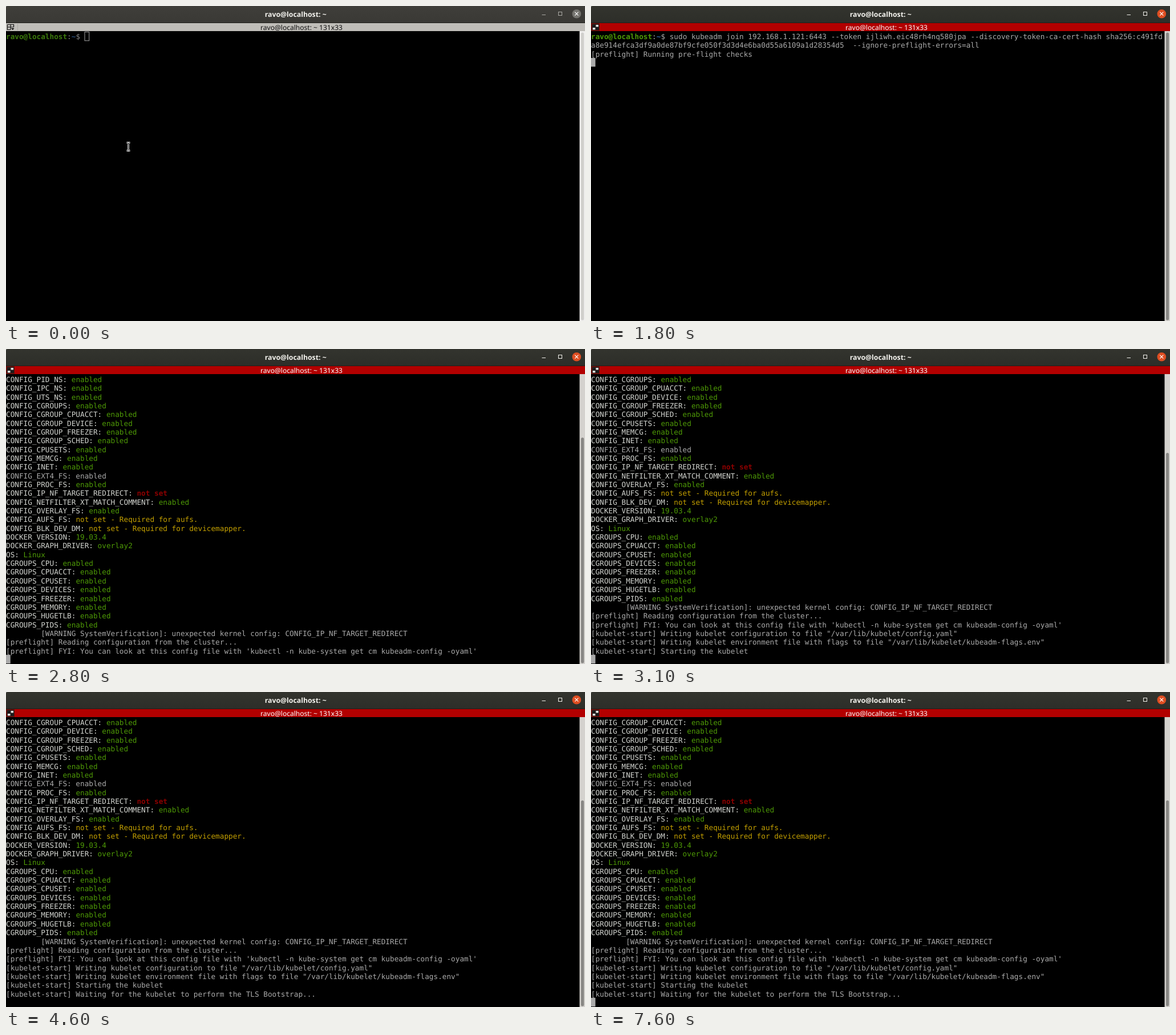
Animation, 1015 px wide and 552 px high, one loop 8000 ms. Source, as an HTML page:

```html
<!DOCTYPE html>
<html lang="en">
<head>
<meta charset="utf-8">
<title>Terminal</title>
<style>
  html, body { margin: 0; width: 100%; height: 100%; overflow: hidden; background: #000; }
  svg { display: block; }
  text { white-space: pre; text-rendering: geometricPrecision; }
  #rows text { font: 12.717px "DejaVu Sans Mono", monospace; }
  #rows .bold { font-weight: bold; }
  .ui { font-family: "Noto Sans", sans-serif; text-anchor: middle; }
</style>
</head>
<body>
<svg id="stage" width="1015" height="552" viewBox="0 0 1015 552">
  <defs>
    <linearGradient id="barOff" x2="0" y2="1"><stop stop-color="#3f3e3a"/><stop offset="1" stop-color="#3a3935"/></linearGradient>
    <linearGradient id="barOn" x2="0" y2="1"><stop stop-color="#33342e"/><stop offset="1" stop-color="#2d2e29"/></linearGradient>
  </defs>
  <rect width="1015" height="552"/>
  <rect id="bar" width="1015" height="29"/>
  <path d="M0 0H2L0 2Z" fill="#777"/>
  <path d="M0 29.5H1015" stroke="#1f1f1b"/>
  <text class="ui" x="507.7" y="18.5" font-size="12.3" font-weight="bold" fill="#f4f3ee">ravo@localhost: ~</text>
  <g id="buttons" fill="none">
    <path d="M939.5 15.5H946"/>
    <rect x="968.5" y="10.5" width="6" height="6"/>
  </g>
  <circle id="close" cx="1000.3" cy="13.7" r="7.8"/>
  <path d="M997.3 10.7l6 6m0 -6l-6 6" stroke="#fff" stroke-width="1.2"/>

  <rect id="strip" y="30" width="1015" height="14"/>
  <text id="stripText" class="ui" x="518" y="41.7" font-size="12.06">ravo@localhost: ~ 131x33</text>
  <g id="iconOff">
    <path d="M2.5 32.5H13.5V37M2.5 32.5V41.5H8M2.5 37H13.5M8 32.5V41.5" fill="none" stroke="#111" stroke-width="1.2"/>
    <path d="M9 39H14.5L11.7 42Z"/>
    <path d="M20.5 31V43" stroke="#aaa8a3"/>
  </g>
  <g id="iconOn">
    <rect x="0" y="30" width="15" height="14" fill="#65110c"/>
    <rect x="2" y="32" width="12" height="10" fill="#1b1b1b"/>
    <path d="M8.5 33H13V36.5H8.5ZM3 38H7.5V41.5H3Z" fill="#e4e4e0"/>
  </g>

  <g id="rows"></g>
  <rect id="cursor" width="7.7" height="15.3"/>
  <rect id="trough" x="1005.5" y="44" width="9.5" height="508"/>
  <rect id="thumb" x="1008" width="5.2" rx="2.6"/>
  <g id="mouse" fill="none">
    <path d="M-3 -7H-1L0 -6L1 -7H3M0 -6V6M-3 7H-1L0 6L1 7H3" stroke="#eee" stroke-width="3"/>
    <path d="M-3 -7H-1L0 -6L1 -7H3M0 -6V6M-3 7H-1L0 6L1 7H3" stroke="#000"/>
  </g>
</svg>
<script>
const LOOP = 8000, COLS = 131, ROWS = 33;
const CELL = 7.656, PITCH = 15.34, TOP = 45;
const GREY = "#aaaaaa", LABEL = "#d3d5d0", GREEN = "#4e9a06", RED = "#8c0000", YELLOW = "#c4a000";
const $ = id => document.getElementById(id);
const set = (id, attrs) => { for (const k in attrs) $(id).setAttribute(k, attrs[k]); };

const HOST = "ravo@localhost";
const COMMAND = "sudo kubeadm join 192.168.1.121:6443 --token ijliwh.eic48rh4nq580jpa " +
  "--discovery-token-ca-cert-hash sha256:c491fda8e914efca3df9a0de87bf9cfe050f3d3d4e6ba0d55a6109a1d28354d5" +
  "  --ignore-preflight-errors=all";
const PROMPT = HOST + ":~$ ";
const INDENT = " ".repeat(8);

const wrap = s => s.match(new RegExp(`.{1,${COLS}}`, "g"));
const enabled = (prefix, names) => names.split(" ").map(n => `${prefix}_${n}: enabled`);

const lines = [
  ...wrap(PROMPT + COMMAND),
  "[preflight] Running pre-flight checks",
  ...wrap(INDENT + '[WARNING IsDockerSystemdCheck]: detected "cgroupfs" as the Docker cgroup driver. ' +
    'The recommended driver is "systemd". Please follow the guide at https://kubernetes.io/docs/setup/cri/'),
  "[preflight] The system verification failed. Printing the output from the verification:",
  "KERNEL_VERSION: 5.0.0-37-generic",
  ...enabled("CONFIG", "NAMESPACES NET_NS PID_NS IPC_NS UTS_NS CGROUPS CGROUP_CPUACCT CGROUP_DEVICE " +
    "CGROUP_FREEZER CGROUP_SCHED CPUSETS MEMCG INET EXT4_FS PROC_FS"),
  "CONFIG_IP_NF_TARGET_REDIRECT: not set",
  ...enabled("CONFIG", "NETFILTER_XT_MATCH_COMMENT OVERLAY_FS"),
  "CONFIG_AUFS_FS: not set - Required for aufs.",
  "CONFIG_BLK_DEV_DM: not set - Required for devicemapper.",
  "DOCKER_VERSION: 19.03.4",
  "DOCKER_GRAPH_DRIVER: overlay2",
  "OS: Linux",
  ...enabled("CGROUPS", "CPU CPUACCT CPUSET DEVICES FREEZER MEMORY HUGETLB PIDS"),
  INDENT + "[WARNING SystemVerification]: unexpected kernel config: CONFIG_IP_NF_TARGET_REDIRECT",
  "[preflight] Reading configuration from the cluster...",
  "[preflight] FYI: You can look at this config file with 'kubectl -n kube-system get cm kubeadm-config -oyaml'",
  '[kubelet-start] Writing kubelet configuration to file "/var/lib/kubelet/config.yaml"',
  '[kubelet-start] Writing kubelet environment file with flags to file "/var/lib/kubelet/kubeadm-flags.env"',
  "[kubelet-start] Starting the kubelet",
  "[kubelet-start] Waiting for the kubelet to perform the TLS Bootstrap..."
];

// [time, number of printed lines]
const PRINTED = [[0, 0], [700, 2], [1800, 3], [2400, 5], [2500, 39], [2700, 41], [3100, 44], [3300, 45]];
const FOCUS = 300, PASTE = 700, BLINK_OFF = 1100, MOUSE_GONE = 1200, ENTER = 1600, BLINK = 600;

// Splits a line into [text, colour, bold] runs
function runs(line, focus) {
  if (line.startsWith(HOST)) return [
    [HOST, focus ? GREEN : "#3c7a0c", true],
    [":", focus ? GREY : "#858585"],
    ["~", focus ? "#3465a4" : "#2b507e", true],
    [line.slice(HOST.length + 2), focus ? GREY : "#858585"]
  ];
  const pair = line.match(/^([A-Z_]+: )(.*)$/);
  if (!pair) return [[line, GREY]];
  const unset = pair[2] === "not set";
  const colour = unset ? RED : pair[2].includes("Required") ? YELLOW : GREEN;
  return [[pair[1], LABEL], [pair[2], colour, unset]];
}

function make(tag, parent) {
  return parent.appendChild(document.createElementNS("http://www.w3.org/2000/svg", tag));
}

function drawRows(shown, focus) {
  $("rows").textContent = "";
  shown.forEach((line, row) => {
    const text = make("text", $("rows"));
    text.setAttribute("y", TOP + 13 + row * PITCH);
    for (const [str, colour, bold] of runs(line, focus)) {
      const span = make("tspan", text);
      span.textContent = str;
      span.setAttribute("fill", colour);
      if (bold) span.setAttribute("class", "bold");
    }
  });
}

function drawChrome(focus) {
  set("bar", { fill: `url(#${focus ? "barOn" : "barOff"})` });
  set("buttons", { stroke: focus ? "#f2f1ec" : "#aaa9a4" });
  set("close", { fill: focus ? "#df4e22" : "#75746f" });
  set("strip", { fill: focus ? "#b20000" : "#bfbdb8" });
  set("stripText", { fill: focus ? "#fff" : "#111" });
  set("iconOff", { visibility: focus ? "hidden" : "visible" });
  set("iconOn", { visibility: focus ? "visible" : "hidden" });
  set("trough", { fill: focus ? "#d4d2ce" : "#efeeed" });
  set("thumb", { fill: focus ? "#888784" : "#d0cfcc" });
}

function drawCursor(t, count, hidden, focus) {
  let row = count, col = 0;
  if (t < PASTE) [row, col] = [0, PROMPT.length];
  else if (t < ENTER) [row, col] = [1, lines[1].length];
  const lit = t < ENTER ? t < BLINK_OFF : Math.floor((t - ENTER) / BLINK) % 2 === 0;
  const inset = focus ? 0 : 0.5;
  set("cursor", {
    x: col * CELL + inset - (focus ? 0 : 0.3),
    y: TOP + (row - hidden) * PITCH + inset,
    fill: focus ? GREY : "none",
    stroke: focus ? "none" : "#a5a5a5",
    visibility: lit ? "visible" : "hidden"
  });
}

function drawMouse(t) {
  const p = Math.min(1, Math.max(0, (t - 300) / 600));
  const e = p * p * (3 - 2 * p);
  set("mouse", {
    transform: `translate(${214.5 + 709 * e} ${246.5 + 13 * e})`,
    visibility: t < MOUSE_GONE ? "visible" : "hidden"
  });
}

let lastState = "";
function render(now) {
  const t = Math.floor(now % LOOP / 100) * 100;
  const focus = t >= FOCUS;
  const count = PRINTED.filter(p => t >= p[0]).pop()[1];
  const hidden = Math.max(0, count + 1 - ROWS);
  const state = count + "/" + focus;
  if (state !== lastState) {
    lastState = state;
    drawRows(count ? lines.slice(hidden, count) : [PROMPT], focus);
    drawChrome(focus);
    const y = 46.5 + 508 * hidden / (ROWS + hidden);
    set("thumb", { y, height: 550.5 - y });
  }
  drawCursor(t, count, hidden, focus);
  drawMouse(t);
}

const start = performance.now();
function tick() {
  render(performance.now() - start);
  requestAnimationFrame(tick);
}
tick();
</script>
</body>
</html>
```
